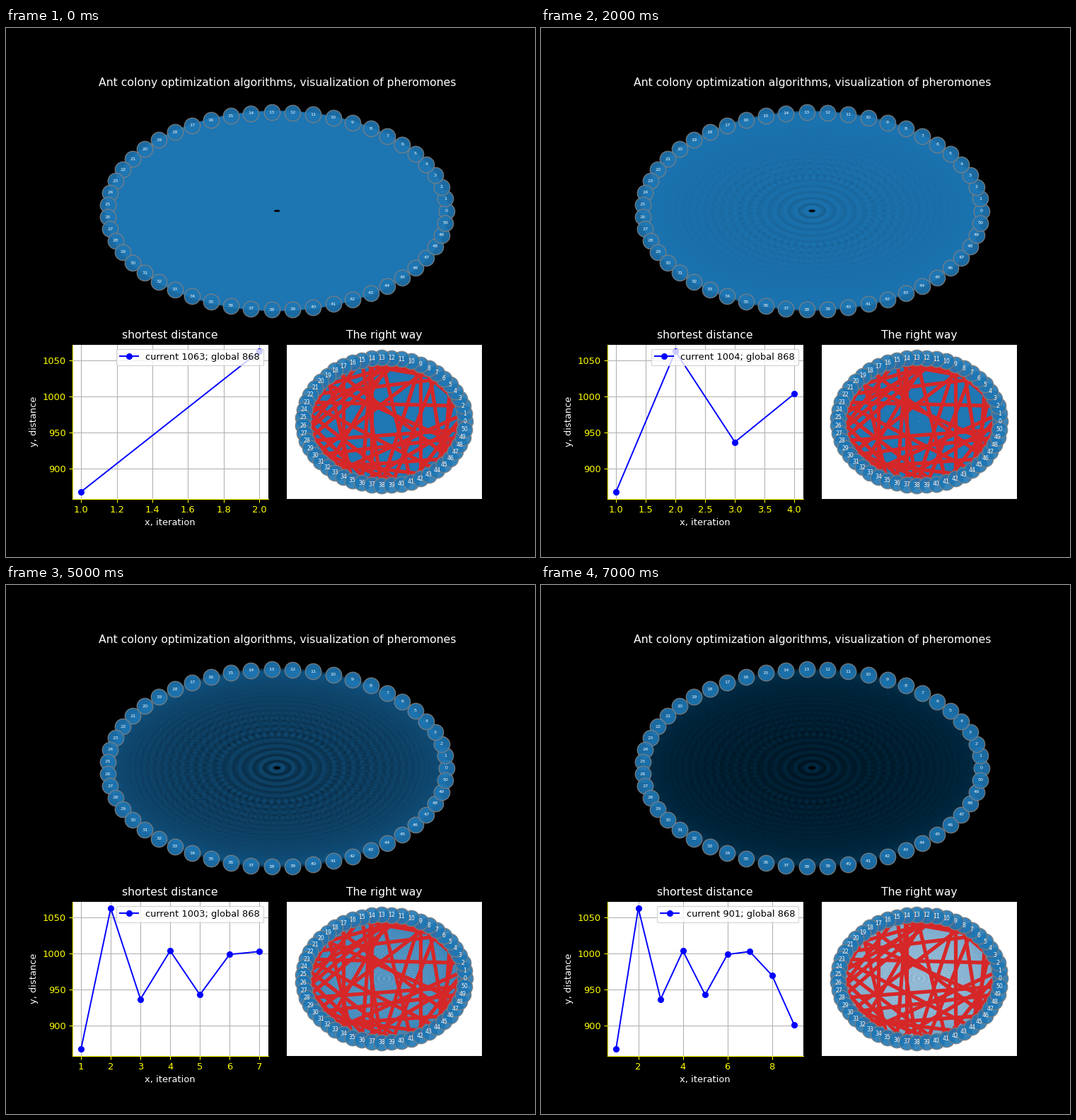
Animation, 748 px wide and 748 px high, one loop 8 s. Source, as a matplotlib script:

```python
import random
from itertools import combinations

import matplotlib.pyplot as plt
import numpy as np
from matplotlib.animation import FuncAnimation
from matplotlib.collections import LineCollection
from matplotlib.gridspec import GridSpec

NODES = 51
DECAY = 0.67
MAX_GAP = 23
DISTANCES = [868, 1063, 937, 1004, 943, 999, 1003, 970, 901]
BEST = min(DISTANCES)


def ring_gap(a, b):
    return min((a - b) % NODES, (b - a) % NODES)


def make_tour():
    """Random closed tour whose chords mostly stay off the centre."""
    rng = random.Random(7)
    tour = [14, 37]
    rest = [n for n in range(NODES) if n not in tour]
    while rest:
        near = [n for n in rest if ring_gap(tour[-1], n) <= MAX_GAP]
        tour.append(rng.choice(near or rest))
        rest.remove(tour[-1])
    return tour


angles = 2 * np.pi * np.arange(NODES) / NODES
pos = np.column_stack([np.cos(angles), np.sin(angles)])
all_edges = [pos[list(pair)] for pair in combinations(range(NODES), 2)]
tour = make_tour()
tour_edges = [pos[[a, b]] for a, b in zip(tour, tour[1:] + tour[:1])]

fig = plt.figure(figsize=(8, 8), dpi=93.5, facecolor="black")
grid = GridSpec(5, 4, figure=fig, left=0.125, right=0.9, bottom=0.11,
                top=0.88, wspace=0.2, hspace=0.2)
trail_ax = fig.add_subplot(grid[:3, :])
chart_ax = fig.add_subplot(grid[3:, :2])
route_ax = fig.add_subplot(grid[3:, 2:])


def add_edges(ax, edges, color):
    lines = LineCollection(edges, colors=color, linewidths=4, zorder=1)
    ax.add_collection(lines, autolim=False)
    return lines


def draw_graph(ax, title, font_size):
    """Draw the ring of numbered nodes and return its pheromone edges."""
    low, high = pos.min(axis=0), pos.max(axis=0)
    pad = 0.105 * (high - low)
    ax.set_xlim(low[0] - pad[0], high[0] + pad[0])
    ax.set_ylim(low[1] - pad[1], high[1] + pad[1])
    ax.set(xticks=[], yticks=[])
    ax.set_title(title, color="white")
    trails = add_edges(ax, all_edges, "tab:blue")
    ax.scatter(*pos.T, s=300, c="tab:blue", edgecolors="tab:gray",
               linewidths=1, alpha=0.9, zorder=2)
    for i, (x, y) in enumerate(pos):
        ax.text(x, y, str(i), size=font_size, color="whitesmoke",
                ha="center", va="center", zorder=3)
    return trails


trail_ax.set_facecolor("black")
trails = [
    draw_graph(trail_ax,
               "Ant colony optimization algorithms, visualization of pheromones", 5),
    draw_graph(route_ax, "The right way", 6),
]
add_edges(route_ax, tour_edges, "tab:red")


def draw_chart(count):
    ax = chart_ax
    ax.clear()
    values = DISTANCES[:count]
    ax.plot(range(1, count + 1), values, "o-", color="blue",
            label=f"current {values[-1]}; global {BEST}")
    ax.set_title("shortest distance", color="white")
    ax.set_xlabel("x, iteration", color="white")
    ax.set_ylabel("y, distance", color="white")
    ax.tick_params(colors="yellow")
    for side in ("left", "bottom"):
        ax.spines[side].set_color("yellow")
    ax.grid(True)
    ax.legend(loc="upper right")


def update(frame):
    count = frame + 2
    for lines in trails:
        lines.set_alpha(DECAY ** count)
    draw_chart(count)
    return []


anim = FuncAnimation(fig, update, frames=len(DISTANCES) - 1, interval=1000,
                     repeat=True, repeat_delay=0, blit=False)
plt.show()
```
